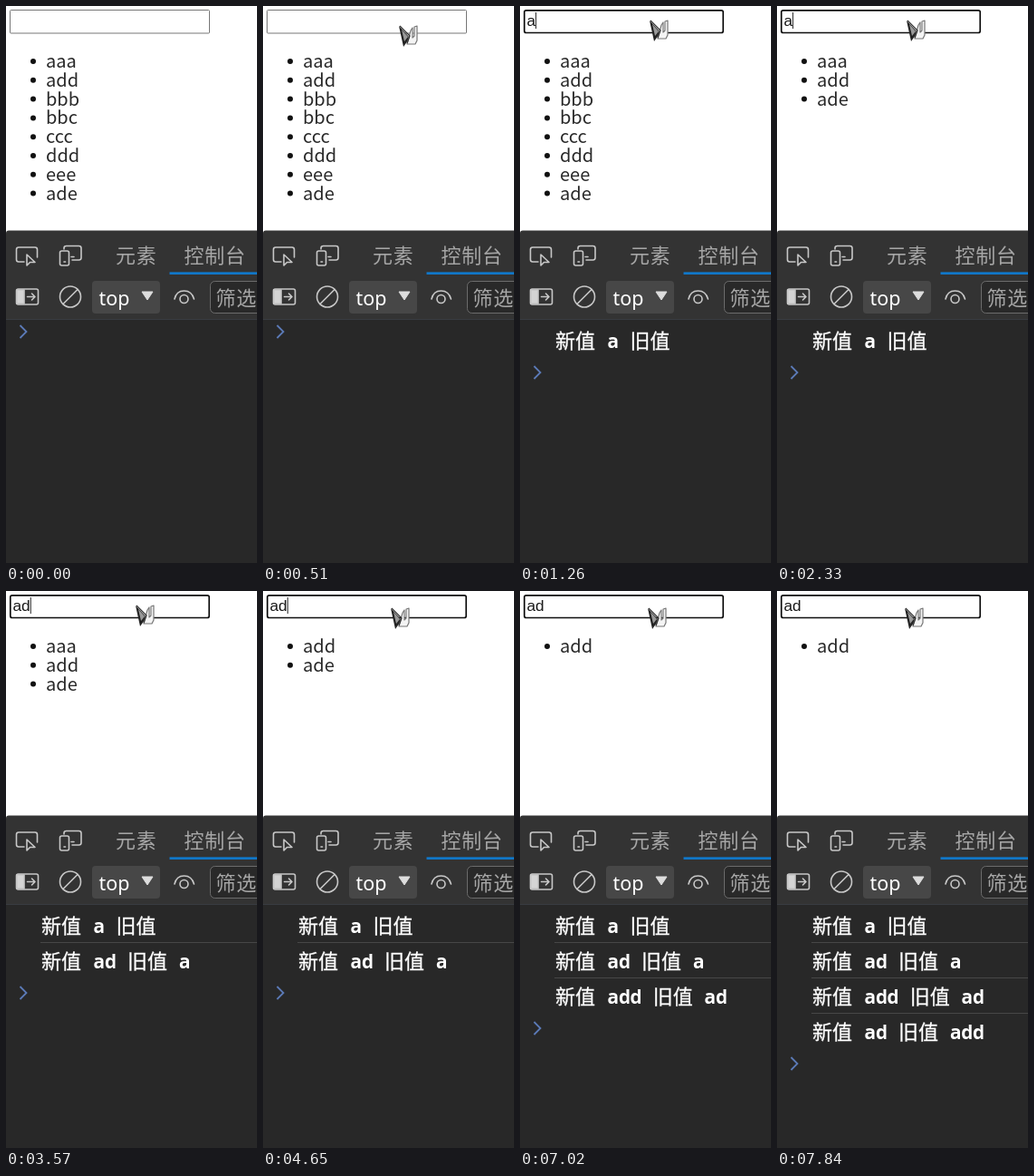
An HTML page for the animation above (8 s loop, 277 by 614 pixels).

```html
<!DOCTYPE html>
<html lang="zh">
<head>
<meta charset="utf-8">
<title>Filter list</title>
<style>
  html, body { margin: 0; width: 100%; height: 100%; overflow: hidden; background: #fff; }
  svg { display: block; }
  text { white-space: pre; }
  .cjk { font: 22px "Noto Sans CJK SC", "Noto Sans CJK JP", "Noto Sans CJK", sans-serif; }
  .tab { letter-spacing: 0.8px; fill: #a6a6a6; }
  .item { font: 300 20px "Noto Sans CJK SC", "Noto Sans CJK JP", "Noto Sans CJK", sans-serif; fill: #282828; }
  .mono { font: 600 21px "Noto Sans Mono", "DejaVu Sans Mono", monospace; }
  .field { font: 17.3px "Liberation Sans", Arial, sans-serif; fill: #1c1c1c; }
  .top { font: 21.5px "Noto Sans", "Open Sans", sans-serif; fill: #fff; }
  .icon { fill: none; stroke: #c8c8c8; stroke-width: 1.6; stroke-linejoin: round; stroke-linecap: round; }
  #logs { fill: #fff; }
  #logs .cjk { font-weight: 500; stroke: #fff; stroke-width: 0.3; }
</style>
</head>
<body>
<svg width="277" height="614" viewBox="0 0 277 614">
  <rect width="277" height="614" fill="#fff"/>
  <rect id="box" fill="#fff"/>
  <text id="value" class="field" x="7.5" y="22"></text>
  <rect id="caret" y="7" width="1" height="18" fill="#222"/>
  <g id="list"></g>

  <path d="M0 614V250.500Q0 247.500 3 247.500H277V614Z" fill="#333"/>
  <rect y="346" width="277" height="268" fill="#282828"/>
  <rect y="345" width="277" height="1" fill="#393c41"/>
  <rect x="180.500" y="293.300" width="97" height="2.700" fill="#1177c8"/>

  <g class="icon">
    <path d="M20 282H14Q11.500 282 11.500 279.500V268.500Q11.500 266 14 266H32Q34.500 266 34.500 268.500V277"/>
    <path d="M23 274V286L26.500 282.500H32Z"/>
    <path d="M64 268V267Q64 264.500 66.500 264.500H80.500Q83 264.500 83 267V277.500Q83 280 80.500 280H73M72 276.500H75"/>
    <rect x="59.500" y="270" width="10" height="16" rx="2"/>
    <path d="M64 282H65.500"/>
    <rect x="11.500" y="312" width="24" height="17" rx="2"/>
    <path d="M12 313H20V328H12Z" fill="#d4d4d4"/>
    <path d="M23.500 320.500H31.500M28.500 317L32 320.500L28.500 324"/>
    <circle cx="71" cy="320.500" r="11.500"/>
    <path d="M63 328.500L79 312.500"/>
    <path d="M186 323Q188 314 196.500 314Q205 314 207.500 323"/>
    <circle cx="196.500" cy="323" r="4.500"/>
  </g>
  <text class="cjk tab" x="121" y="283">元素</text>
  <text class="cjk tab" x="196.500" y="283">控制台</text>
  <rect x="95" y="303" width="75" height="36" rx="4" fill="#474747"/>
  <text class="top" x="102.500" y="329.500">top</text>
  <path d="M150 315H162L156 324Z" fill="#ddd" stroke="#ddd" stroke-linejoin="round"/>
  <rect x="225.500" y="303.500" width="70" height="35" rx="5" fill="#292929" stroke="#6c6c6c"/>
  <text class="cjk tab" x="231.500" y="330">筛选</text>

  <g id="logs"></g>
  <path id="prompt" d="M-3 -7L4 0L-3 7" fill="none" stroke="#5c7bb8" stroke-width="1.800"/>

  <g id="pointer" stroke-linejoin="round">
    <path d="M0 0L5 23L12 13Z" fill="#222"/>
    <path d="M3 4L6 17L10 12Z" fill="#999"/>
    <path d="M9 20L13 5L15 2V13L17 11V1L20 0V16L18 20Z" fill="#f4f4f4" stroke="#777" stroke-width="1.200"/>
    <path d="M1 0L12 11L9 19" fill="none" stroke="#333" stroke-width="1.200"/>
  </g>
</svg>
<script>
const LOOP = 8000;
const words = ['aaa', 'add', 'bbb', 'bbc', 'ccc', 'ddd', 'eee', 'ade'];
const $ = id => document.getElementById(id);

// Each track is a list of [start ms, value].
const tracks = {
  focus: [[0, false], [760, true]],
  value: [[0, ''], [1260, 'a'], [3570, 'ad'], [5140, 'add'], [7020, 'ad']],
  query: [[0, ''], [2330, 'a'], [4650, 'ad'], [6310, 'add']],
  logs: [[0, 0], [1260, 1], [3570, 2], [5230, 3], [7110, 4]],
  caret: [0, 760, 1830, 2330, 2900, 3400, 4160, 4650, 5720, 6230, 6770, 7360, 7840]
    .map((ms, i) => [ms, i % 2 === 1]),
  pointer: [[0, null], [260, [262, 74]], [340, [214, 50]], [430, [170, 30]], [510, [150, 22]],
    [590, [147, 19]], [680, [143, 16]], [4310, [142, 18]], [4390, [141, 19]]]
};
const entries = [['a', ''], ['ad', 'a'], ['add', 'ad'], ['ad', 'add']];
const CELL = 12.6;
const LETTER = 9.62;

const at = (track, t) => track.reduce((v, [ms, next]) => ms <= t ? next : v, track[0][1]);
const label = (cls, x, y, s) => `<text class="${cls}" x="${x}" y="${y}">${s}</text>`;

function setAttrs(el, attrs) {
  for (const k in attrs) el.setAttribute(k, attrs[k]);
}

function listMarkup(query) {
  return words.filter(w => w.startsWith(query)).map((w, i) => {
    const y = 61 + i * 20.8;
    return `<circle cx="30" cy="${y}" r="3" fill="#111"/>` + label('item', 44, y + 7, w);
  }).join('');
}

function logMarkup([now, old], i) {
  const y = 377 + i * 39;
  const oldX = 96.3 + CELL * (now.length + 1);
  const rule = i ? `<rect x="38" y="${y - 29}" width="239" height="1" fill="#474747"/>` : '';
  return rule + label('cjk', 39, y, '新值') + label('mono', 96.3, y, now) +
    label('cjk', oldX, y, '旧值') + label('mono', oldX + 44 + CELL, y, old);
}

function draw(s) {
  setAttrs($('box'), s.focus
    ? { x: 4.8, y: 4.8, width: 219.4, height: 24.7, rx: 2, stroke: '#101010', 'stroke-width': 1.7 }
    : { x: 4.5, y: 4.5, width: 220, height: 25.5, rx: 1, stroke: '#767676', 'stroke-width': 1 });
  $('value').textContent = s.value;
  setAttrs($('caret'), { x: 7.5 + LETTER * s.value.length, visibility: s.caret ? 'visible' : 'hidden' });
  $('list').innerHTML = listMarkup(s.query);
  $('logs').innerHTML = entries.slice(0, s.logs).map(logMarkup).join('');
  setAttrs($('prompt'), { transform: `translate(18.5 ${s.logs ? 365 + 39 * s.logs : 359})` });
  setAttrs($('pointer'), s.pointer
    ? { transform: `translate(${s.pointer})`, visibility: 'visible' }
    : { visibility: 'hidden' });
}

let shown = '';
function tick() {
  const t = performance.now() % LOOP;
  const state = {};
  for (const k in tracks) state[k] = at(tracks[k], t);
  const key = JSON.stringify(state);
  if (key !== shown) draw(state);
  shown = key;
  requestAnimationFrame(tick);
}
tick();
</script>
</body>
</html>
```
